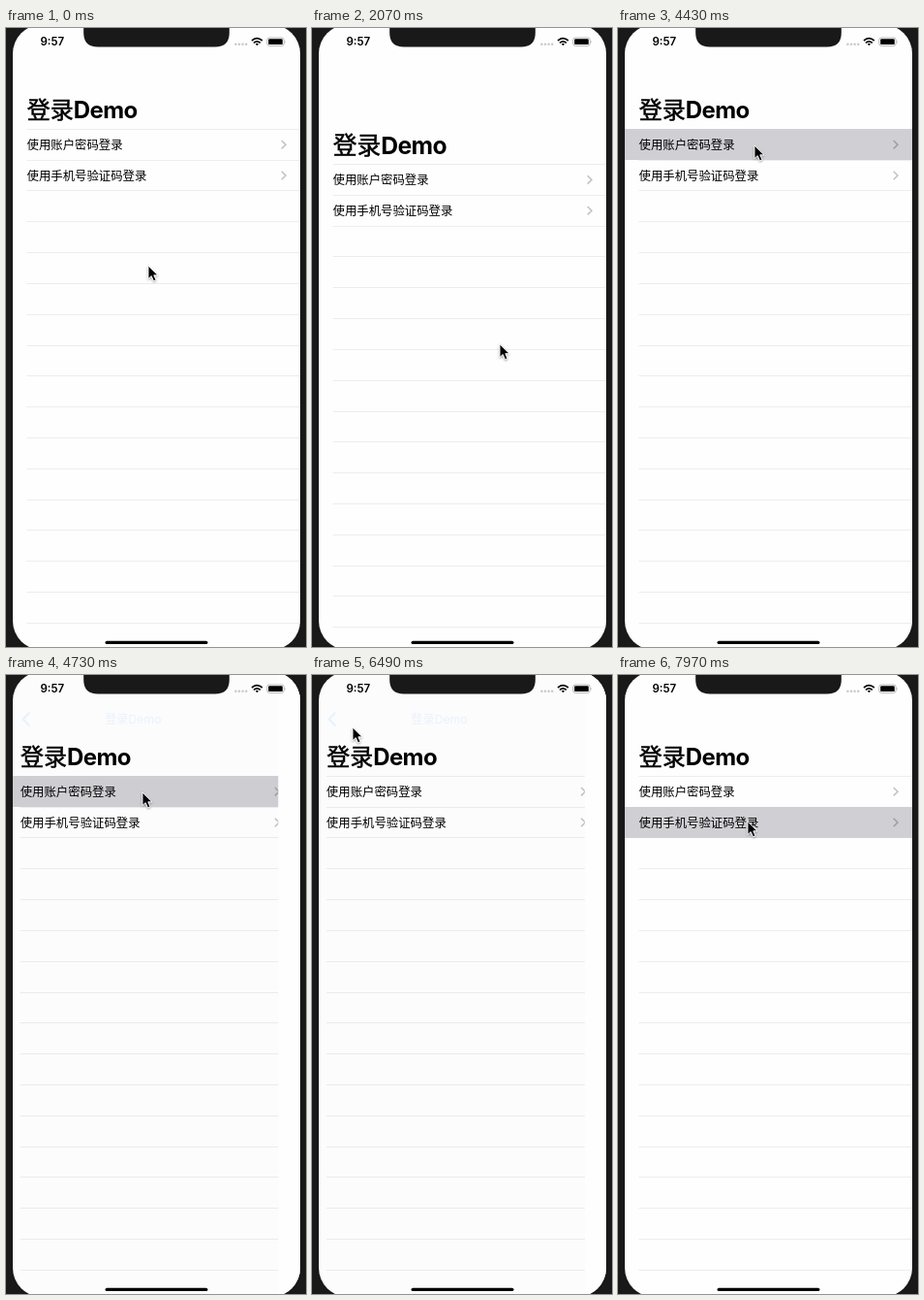
These frames come from a looping animation (310x638 px, 8 s). An HTML page:

```html
<!DOCTYPE html>
<html lang="zh-CN">
<head>
<meta charset="utf-8">
<title>登录Demo</title>
<style>
html, body { margin: 0; width: 100%; height: 100%; overflow: hidden; background: #191919; }
svg { display: block; width: 310px; height: 638px; }
text { font: 12.4px Inter, 'Noto Sans CJK SC', sans-serif; }
#big { font-size: 24px; stroke: #000; stroke-width: .5; }
#big tspan { font-weight: 700; letter-spacing: -.6px; stroke: none; }
#small { font-size: 12.2px; stroke: #000; stroke-width: .2; }
#small tspan { font-weight: 600; stroke: none; }
#hello, #label { font-size: 12.2px; }
#clock { font-size: 11.5px; font-weight: 600; }
</style>
</head>
<body>
<svg viewBox="0 0 310 638">
  <defs>
    <clipPath id="screen"><rect x="7" y="-3.5" width="297" height="644.5" rx="30"/></clipPath>
    <filter id="shadow" x="-50%" y="-50%" width="200%" height="200%">
      <feDropShadow dx="0" dy="1" stdDeviation=".8" flood-opacity=".4"/>
    </filter>
  </defs>
  <rect width="310" height="638" fill="#191919"/>
  <g clip-path="url(#screen)">
    <rect x="7" y="-4" width="297" height="646" fill="#fefefe"/>
    <g id="list">
      <g id="lines" fill="#ededef"></g>
      <rect id="mark" x="7" width="297" height="32" fill="#d0cfd4"/>
      <g id="rows">
        <text x="21.5" y="124.8">使用账户密码登录</text>
        <text x="21.5" y="156.6">使用手机号验证码登录</text>
        <path d="M284.7 116l4.3 4.2-4.3 4.2M284.7 147.8l4.3 4.2-4.3 4.2"
          fill="none" stroke="#000" stroke-opacity=".24" stroke-width="1.5"/>
      </g>
      <text id="big">登录<tspan>Demo</tspan></text>
      <text id="small" x="155.5" y="49.7" text-anchor="middle">登录<tspan>Demo</tspan></text>
    </g>
    <rect id="dim" x="7" y="-4" width="297" height="646"/>
    <g id="detail">
      <rect x="7" y="-4" width="297" height="646" fill="#fefefe"/>
      <text id="hello" x="155.5" y="365" text-anchor="middle" letter-spacing="-.4">Hello, World!</text>
    </g>
    <g id="back" fill="#007aff">
      <path d="M24.3 38.8l-6.6 6.8 6.6 6.8" fill="none" stroke="#007aff" stroke-width="2.2"/>
      <text id="label" x="28.3" y="49.7">登录Demo</text>
    </g>
    <text id="clock" x="35.5" y="18.2">9:57</text>
    <path d="M237.4 16.7h11" stroke="#c8c8ca" stroke-width="2.5" stroke-linecap="round" stroke-dasharray="0 3.6"/>
    <g fill="none" stroke="#000" stroke-width="1.7">
      <path d="M254 13q5.3-4.6 10.8 0M256 15.3q3.3-2.8 6.8 0"/>
      <path d="M257.8 16.3q1.6-1.2 3.2 0l-1.6 1.9z" fill="#000" stroke="none"/>
    </g>
    <rect x="269.8" y="10" width="17.4" height="8.4" rx="2.4" fill="none" stroke="#a5a5a7" stroke-width=".8"/>
    <rect x="271.2" y="11.3" width="14.6" height="5.8" rx="1.2"/>
    <path d="M288.2 12.8q1.4 1.4 0 2.8z" fill="#a5a5a7"/>
    <rect x="102.5" y="631.7" width="106" height="3.4" rx="1.7"/>
  </g>
  <path d="M77-4Q80.2-3 80.2 1V5Q80.2 19.5 95 19.5H216Q230.8 19.5 230.8 5V1Q230.8-3 234-4z" fill="#191919"/>
  <path id="cursor" d="M0 0V13.6L3.2 10.6L5.5 15.8L8 14.8L5.8 9.8H10Z"
    stroke="#fff" stroke-width=".9" filter="url(#shadow)"/>
</svg>
<script>
const LOOP = 8000, STEP = 147.3, WIDTH = 297, START_Y = 245;
const $ = id => document.getElementById(id);
const set = (id, attrs) => {
  for (const name in attrs) $(id).setAttribute(name, attrs[name]);
};
const progress = (t, from, to) => Math.min(1, Math.max(0, (t - from) / (to - from)));
const easeOut = k => 1 - (1 - k) ** 3;
const glide = (t, from, to) => {
  const k = progress(t, from, to);
  return k * k * (3 - 2 * k);
};

// Places where the pointer turns or rests: time, x, y.
const stops = [
  [300, 147, START_Y], [1900, 192, 344], [2357, 199, 281], [3100, 199, 281], [3830, 141, 121],
  [4715, 141, 121], [5450, 58, 96], [5900, 42, 54], [6520, 42, 54], [7800, 134, 151]
];

function pointerAt(t) {
  let [, x, y] = stops[0];
  for (let i = 1; i < stops.length; i++) {
    const k = glide(t, stops[i - 1][0], stops[i][0]);
    x += (stops[i][1] - x) * k;
    y += (stops[i][2] - y) * k;
  }
  return { x, y };
}

function markedRow(t) {
  if (t > 3830 && t < 5400) return 0;
  return t > 7800 ? 1 : -1;
}

for (let i = 0; i < 18; i++) {
  const line = document.createElementNS('http://www.w3.org/2000/svg', 'rect');
  line.setAttribute('x', 21.5);
  line.setAttribute('width', 282.5);
  line.setAttribute('height', 1);
  $('lines').append(line);
}

function draw(now) {
  // The screen is refreshed in even steps.
  const t = Math.floor(now % LOOP / STEP) * STEP;
  const { x, y } = pointerAt(t);

  // The list follows the drag, flicks past its top and settles.
  const flick = glide(t, 2080, 2340), settle = glide(t, 2970, 3300);
  const bounce = -10 * Math.exp((2357 - t) / 300);
  const offset = flick ? .448 * (y - START_Y) * (1 - flick) + bounce * flick * (1 - settle)
    : .448 * (y - START_Y);
  const compact = flick * (1 - settle);
  const push = easeOut(progress(t, 4700, 5220)) - easeOut(progress(t, 6180, 6700));
  const row = markedRow(t);

  [...$('lines').children].forEach((line, i) =>
    line.setAttribute('y', Math.floor(104.35 + offset + 31.81 * i)));
  set('rows', { transform: `translate(0 ${offset})` });
  set('big', {
    transform: `translate(21.8 ${93.3 + offset}) scale(${1 + Math.max(0, offset) * .0008})`,
    opacity: 1 - compact
  });
  set('small', { opacity: compact });
  set('mark', { y: 104 + 32 * Math.max(0, row), opacity: row < 0 ? 0 : 1 });
  set('list', { transform: `translate(${-.3 * WIDTH * push} 0)` });
  set('dim', { opacity: .1 * push });
  set('detail', { transform: `translate(${WIDTH * (1 - push)} 0)` });
  set('back', { opacity: push });
  set('label', { transform: `translate(${80 * (1 - push)} 0)` });
  set('cursor', { transform: `translate(${x} ${y})` });
  requestAnimationFrame(() => draw(performance.now()));
}
draw(performance.now());
</script>
</body>
</html>
```
